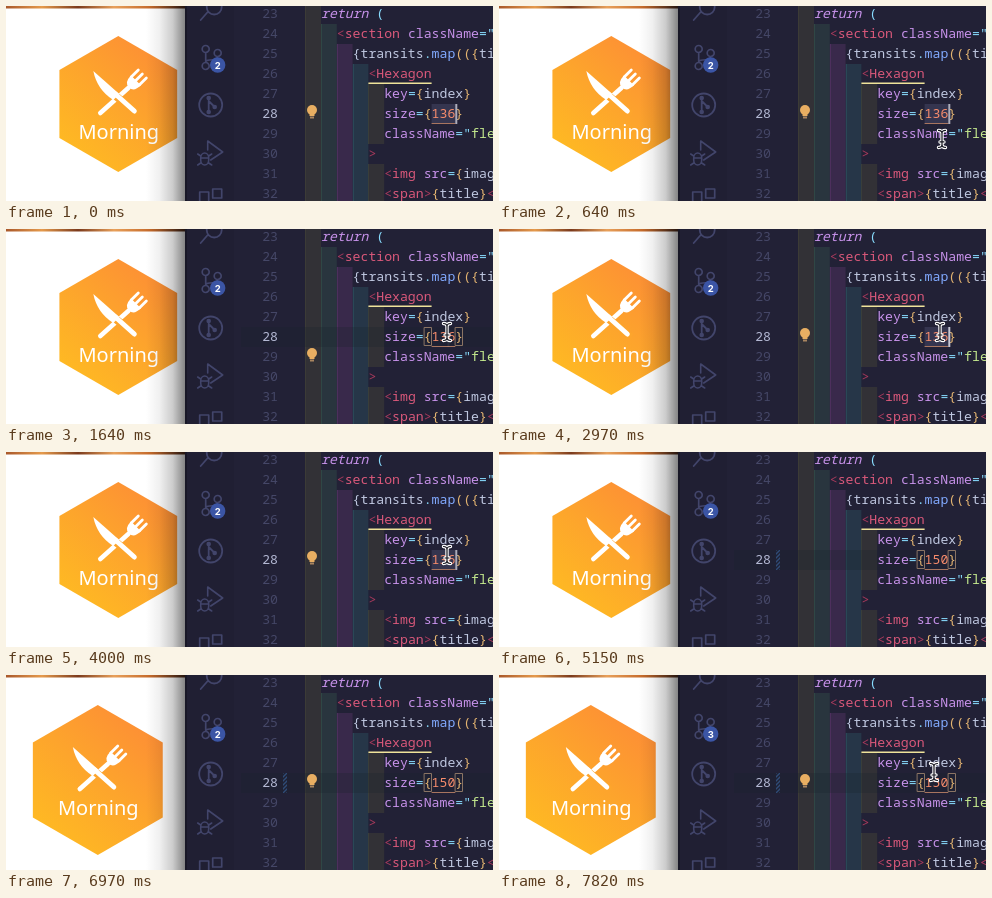
An HTML page with a canvas for the animation above (8 s loop, 487 by 195 pixels).

```html
<!DOCTYPE html>
<html lang="en">
<head>
<meta charset="utf-8">
<title>Hexagon size edit</title>
<style>
html, body { margin: 0; width: 100%; height: 100%; overflow: hidden; background: #222136; }
canvas { display: block; }
</style>
</head>
<body>
<canvas id="stage" width="487" height="195"></canvas>
<script>
const ctx = document.getElementById('stage').getContext('2d');
const LOOP = 8000, LEFT = 299.2, CHAR = 7.9, ROW = 20, EDGE = 180;
const MONO = '13.17px "Noto Sans Mono", monospace';

const INK = {
  p: '#c792ea', // keywords and attributes
  t: '#d9587a', // tags
  d: '#a83a5c', // tag brackets
  c: '#89ddff', // operators
  y: '#e3b471', // brackets
  w: '#bfc7e0', // names
  b: '#82aaff', // calls
  g: '#c3e88d', // strings
  n: '#f78c6c'  // numbers
};

// Each row: indent in characters, then ink and text pairs.
const code = [
  [2, 'p', 'return', 'c', ' ('],
  [4, 'd', '<', 't', 'section', 'p', ' className', 'c', '="'],
  [6, 'w', '{transits', 'c', '.', 'b', 'map', 'y', '(({', 'w', 'ti'],
  [8, 'd', '<', 't', 'Hexagon'],
  [10, 'p', 'key', 'c', '=', 'y', '{', 'w', 'index', 'y', '}'],
  [10, 'p', 'size', 'c', '=', 'y', '{'],
  [10, 'p', 'className', 'c', '="', 'g', 'fle'],
  [8, 'd', '>'],
  [10, 'd', '<', 't', 'img', 'p', ' src', 'c', '=', 'y', '{', 'w', 'imag'],
  [10, 'd', '<', 't', 'span', 'd', '>', 'y', '{', 'w', 'title', 'y', '}', 'd', '<']
];

// Indent guides: colour, then the vertical spans they cover.
const guides = [
  ['rgba(255,255,64,.07)', 0, 195],
  ['rgba(110,255,140,.09)', 18, 195],
  ['rgba(255,110,255,.10)', 38, 195],
  ['rgba(70,236,220,.10)', 58, 195],
  ['rgba(255,255,64,.07)', 78, 138, 158, 195]
];

const CLICK = 1320, SELECT = 2820, TYPE = 4330, RELOAD = 6970;
const keys = [[TYPE, '1'], [4400, '15'], [4485, '150']];
const caretResets = [-180, CLICK, SELECT, ...keys.map(k => k[0])];
const pointerPaths = [
  [[300, 468, 190], [640, 443, 133], [1100, 441, 103], [TYPE, 441, 103]],
  [[7150, 441, 103], [7760, 435, 97], [LOOP, 435, 97]]
];

const colX = col => LEFT + col * CHAR;

function rect(color, x, y, w, h) {
  ctx.fillStyle = color;
  ctx.fillRect(x, y, w, h);
}

function outline(color, x, y, w, h) {
  ctx.strokeStyle = color;
  ctx.lineWidth = 1;
  ctx.strokeRect(Math.round(x) + .5, y + .5, w, h);
}

function text(str, x, y, color, font = MONO, align = 'left') {
  ctx.font = font;
  ctx.textAlign = align;
  ctx.fillStyle = color;
  ctx.fillText(str, x, y);
}

function stroke(path, color, width) {
  ctx.strokeStyle = color;
  ctx.lineWidth = width;
  ctx.stroke(new Path2D(path));
}

function fill(path, color) {
  ctx.fillStyle = color;
  ctx.fill(new Path2D(path));
}

function disc(x, y, r, color) {
  ctx.beginPath();
  ctx.arc(x, y, r, 0, Math.PI * 2);
  ctx.fillStyle = color;
  ctx.fill();
}

function gradient(x0, y0, x1, y1, ...colors) {
  const g = ctx.createLinearGradient(x0, y0, x1, y1);
  colors.forEach((c, i) => g.addColorStop(i / (colors.length - 1), c));
  return g;
}

function at(x, y, draw) {
  ctx.save();
  ctx.translate(x, y);
  draw();
  ctx.restore();
}

function hexagon(size) {
  const h = size / 2, w = size * Math.sqrt(3) / 4;
  fill(`M0 ${-h}L${w} ${-h / 2}V${h / 2}L0 ${h}L${-w} ${h / 2}V${-h / 2}Z`,
    gradient(w, -h, -w, h, '#fd8738', '#fda52c', '#ffc020'));
  stroke('M10-16L-18 9', '#fff', 4.6);
  stroke('M-5-10L17 8', '#fda52c', 8);
  stroke('M-3-10L16 7', '#fff', 5);
  fill('M-25-33L1-10L-5-4Q-21-14-25-33Z', '#fff');
  at(12, -18, () => {
    ctx.rotate(Math.PI / 4);
    fill('M-7-8H7Q7 2 0 2Q-7 2-7-8Z', '#fff');
    stroke('M-5.7-17V-7M0-17V-7M5.7-17V-7', '#fff', 2.8);
  });
  text('Morning', 0.5, 35, '#fff', '300 20px "Noto Sans", sans-serif', 'center');
}

function preview(reloaded) {
  rect('#fff', 0, 0, EDGE, 195);
  rect(gradient(0, 0, EDGE, 0, '#a9582a', '#e59a4c', '#7b3a1c', '#e8a05a', '#c56a2a', '#4a2a1c'), 0, 0, EDGE, 2.5);
  if (reloaded) at(91.8, 105, () => hexagon(150));
  else at(112.3, 98, () => hexagon(136));
  rect(gradient(140, 0, EDGE, 0, 'rgba(0,0,0,0)', 'rgba(0,0,0,.06)', 'rgba(0,0,0,.2)', 'rgba(0,0,0,.5)'), 140, 0, EDGE - 140, 195);
}

function activityBar(badge) {
  const icon = '#42456b';
  rect('#201f33', EDGE, 0, 48, 195);
  rect('#181726', EDGE - 1, 0, 2, 195);
  at(0.7, 0, () => {
    stroke('M201 6L194 14M200 1A7.5 7.5 0 1 0 215 1A7.5 7.5 0 1 0 200 1', icon, 1.8);
    const ring = (x, y) => `M${x - 3.5} ${y}a3.5 3.5 0 1 0 7 0a3.5 3.5 0 1 0-7 0`;
    stroke(ring(199, 43) + ring(199, 60) + ring(211, 47) + 'M199 46.5V56.5M211 50.5Q210 54 203 54Q199 54 199 56.5', icon, 1.7);
    disc(211, 59, 7.7, '#3b55a5');
    text(badge, 211, 62.5, '#fff', 'bold 9.5px Inter, sans-serif', 'center');
    stroke('M192.5 99a11.5 11.5 0 1 0 23 0a11.5 11.5 0 1 0-23 0M202 91V107M202 95L208 101', icon, 1.8);
    disc(202, 92, 2.3, icon);
    disc(202, 106, 2.3, icon);
    disc(208, 101, 2.3, icon);
    stroke('M201 144V135L216 146L204 154M194 152a4 5 0 0 1 8 0v2a4 5 0 0 1-8 0ZM194 152H202M191 148L194 150M205 148L202 150M191 159L194 157M205 159L202 157', icon, 1.6);
    stroke('M193 196V186H202V196M206 192V183H215V192Z', icon, 1.7);
  });
}

function bulb(y) {
  disc(306, y - 3, 5, '#e8ae62');
  rect('#e8ae62', 303.5, y, 5, 3);
  rect('#a98560', 304, y + 3.5, 4, 2);
}

function caretAlpha(t) {
  const start = caretResets.filter(r => r <= t).pop();
  const phase = (t - start) % 1000;
  const away = Math.min(phase, 1000 - phase);
  return Math.max(0, Math.min(1, (335 - away) / 235));
}

function editor(t) {
  const selected = t < CLICK || (t >= SELECT && t < TYPE);
  const value = keys.reduce((v, [time, s]) => t >= time ? s : v, '136');
  rect('#222136', 228, 0, 259, 195);

  guides.forEach(([color, ...spans], i) => {
    for (let s = 0; s < spans.length; s += 2) {
      const height = spans[s + 1] - spans[s];
      rect(color, colX(2 * i), spans[s], 2 * CHAR, height);
      rect(color, Math.round(colX(2 * i)), spans[s], 1, height);
    }
  });

  const numberX = colX(16), closeX = numberX + value.length * CHAR;
  if (selected) rect('#35354f', numberX, 98, 3 * CHAR, 20);
  else {
    rect('rgba(20,32,40,.25)', 235, 98, 252, 20);
    for (const x of [numberX - CHAR, closeX]) outline('#8b7464', x, 98, 7, 18);
  }
  rect('#a8755f', numberX, 117, closeX - numberX, 1);

  code.forEach(([indent, ...parts], row) => {
    const y = 12 + row * ROW;
    text(23 + row, 272, y, row === 5 ? '#b4b9d4' : '#454767', MONO, 'right');
    let col = indent;
    for (let i = 0; i < parts.length; i += 2) {
      const word = parts[i + 1];
      text(word, colX(col), y, INK[parts[i]], (word === 'return' ? 'italic ' : '') + MONO);
      col += word.length;
    }
  });
  text(value, numberX, 112, INK.n);
  text('}', closeX, 112, INK.y);
  rect('#efe39a', colX(8), 76.5, 8 * CHAR, 1.5);

  if (t >= TYPE) {
    ctx.save();
    ctx.beginPath();
    ctx.rect(277, 98, 4, 20);
    ctx.clip();
    for (let y = 96; y < 124; y += 4) stroke(`M276 ${y + 3}L282 ${y - 3}`, '#2f4c78', 1.4);
    ctx.restore();
  }

  if (t >= CLICK + 250 && t < SELECT + 60) bulb(127);
  else if (t < CLICK || (t >= SELECT + 60 && t < TYPE) || t >= 5300) bulb(107);

  const caretX = t >= CLICK && t < SELECT ? numberX + 2 * CHAR : closeX;
  ctx.globalAlpha = caretAlpha(t);
  rect('#f4f4ff', caretX, 98, 2, 20);
  ctx.globalAlpha = 1;
}

function pointer(t) {
  const beam = 'M-3.5-8.5Q0-8.5 0-5.5Q0-8.5 3.5-8.5M0-6V6M-3.5 8.5Q0 8.5 0 5.5Q0 8.5 3.5 8.5M-2 3H2';
  for (const path of pointerPaths) {
    const i = path.findIndex(p => t < p[0]);
    if (i < 1) continue;
    const [t0, x0, y0] = path[i - 1], [t1, x1, y1] = path[i];
    const k = (t - t0) / (t1 - t0);
    at(x0 + (x1 - x0) * k, y0 + (y1 - y0) * k, () => {
      stroke(beam, '#fff', 3.4);
      stroke(beam, '#15151f', 1.2);
    });
  }
}

function frame() {
  const t = performance.now() % LOOP;
  ctx.lineCap = ctx.lineJoin = 'round';
  preview(t >= RELOAD);
  activityBar(t >= 7790 ? '3' : '2');
  editor(t);
  pointer(t);
  requestAnimationFrame(frame);
}
frame();
</script>
</body>
</html>
```
